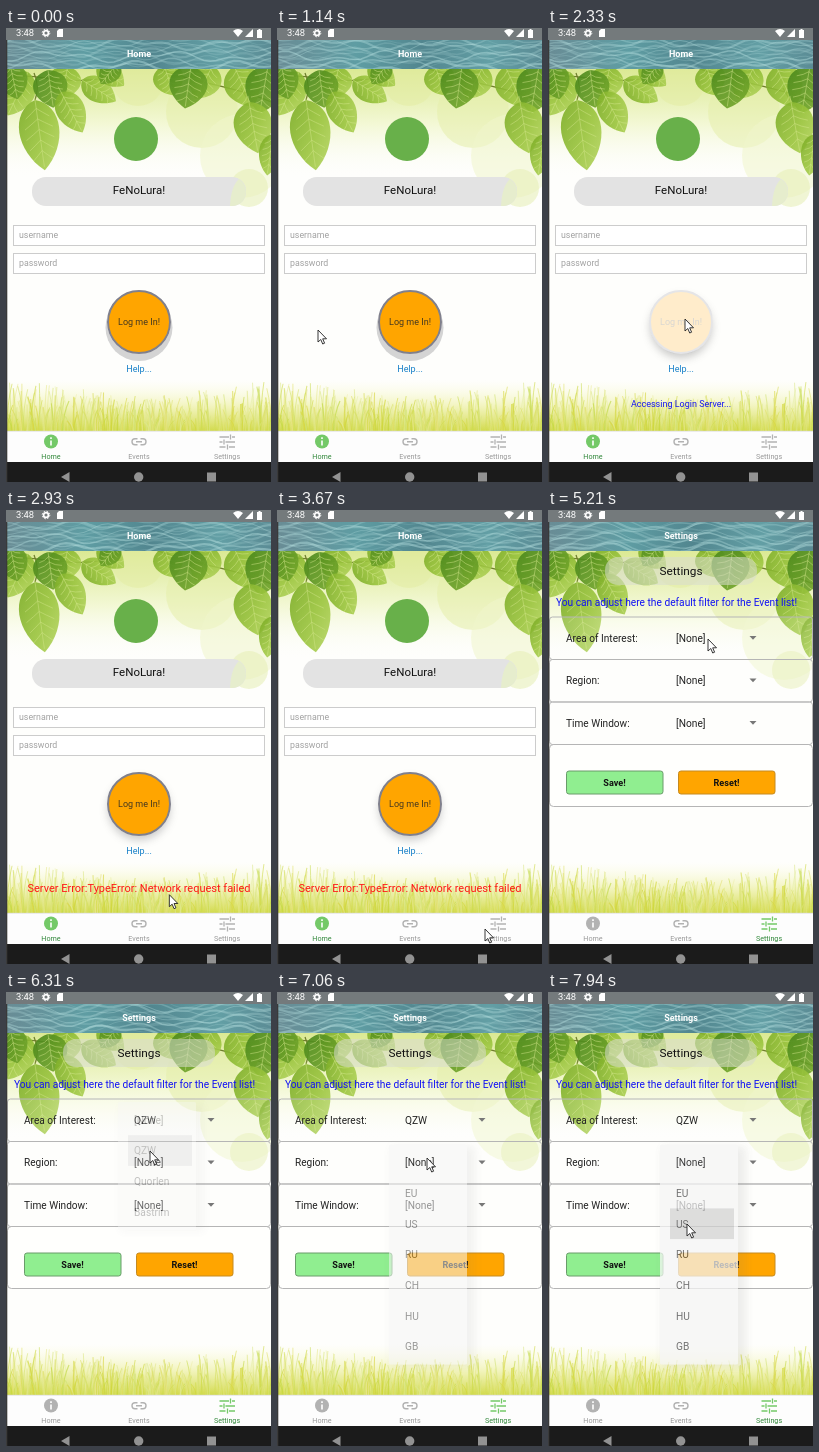
Animation, 265 px wide and 454 px high, one loop 8 s. Source, as an HTML page:

```html
<!DOCTYPE html>
<html lang="en">
<head>
<meta charset="utf-8">
<title>Mobile login and settings</title>
<style>
html, body { margin: 0; width: 100%; height: 100%; overflow: hidden; background: #fff; }
svg { display: block; width: 100%; height: 100%; font-family: Roboto, Arial, sans-serif; }
.mid { text-anchor: middle; }
.bold { font-weight: 700; }
</style>
</head>
<body>
<svg id="stage" viewBox="0 0 265 454"></svg>
<script>
const LOOP = 8000;
const stage = document.getElementById('stage');

let seed = 11;
const random = () => (seed = (seed * 16807) % 2147483647) / 2147483647;
const range = (n, make) => Array.from({ length: n }, (_, i) => make(i)).join('');
const clamp = v => Math.max(0, Math.min(1, v));

// Text is placed by its vertical centre.
const text = (x, y, size, fill, str, cls = '', extra = '') =>
  `<text x="${x}" y="${y + size * .36}" font-size="${size}" fill="${fill}" class="${cls}" ${extra}>${str}</text>`;
const rect = (x, y, w, h, fill, extra = '') =>
  `<rect x="${x}" y="${y}" width="${w}" height="${h}" fill="${fill}" ${extra}/>`;
const circle = (x, y, r, fill, extra = '') =>
  `<circle cx="${x}" cy="${y}" r="${r}" fill="${fill}" ${extra}/>`;
const line = (d, color, width = 1, extra = '') =>
  `<path d="${d}" fill="none" stroke="${color}" stroke-width="${width}" ${extra}/>`;

function leaf([x, y, turn, len, half, tone]) {
  const side = s => `${s * half * 1.3} ${len * .12} ${s * half * 1.25} ${len * .68}`;
  const veins = range(5, i => {
    const v = len * (.12 + i * .15), w = half * (.72 - Math.abs(i - 1.5) * .1);
    return `M${-w} ${v + len * .13}Q${-w * .4} ${v + 4} 0 ${v}Q${w * .4} ${v + 4} ${w} ${v + len * .13}`;
  });
  return `<g transform="translate(${x} ${y}) rotate(${turn})">
    <path d="M0 0C${side(1)} 0 ${len}C${-half * 1.25} ${len * .68} ${-half * 1.3} ${len * .12} 0 0" fill="url(#leaf${tone})" fill-opacity=".9"/>
    ${line(`M0 -6V${len * .95}${veins}`, '#d3e68a', .6, 'opacity=".75"')}</g>`;
}

function grass() {
  return range(330, () => {
    const x = random() * 269 - 2, edge = Math.abs(x - 140) / 140;
    const h = 10 + random() * (24 + 20 * edge), lean = (random() - .5) * 13;
    const hue = 58 + random() * 12, light = 52 + random() * 25;
    return line(`M${x} 404Q${x + lean * .1} ${404 - h * .6} ${x + lean} ${404 - h}`,
      `hsl(${hue} 66% ${light}%)`, .5 + random() * .8, 'opacity=".65"');
  });
}

// x, y, rotation, length, half width, tone
const leaves = [
  [22, 44, 25, 48, 17, 0], [4, 36, -12, 36, 15, 1], [62, 38, 12, 34, 17, 0],
  [42, 42, -8, 38, 18, 1], [29, 72, -8, 71, 21, 0], [55, 64, -28, 46, 15, 0],
  [76, 52, -58, 40, 13, 0], [92, 36, -50, 34, 12, 0], [112, 34, 38, 28, 11, 1],
  [158, 37, -18, 32, 16, 0], [207, 37, 28, 38, 17, 0], [185, 38, 8, 43, 20, 1],
  [228, 38, -25, 45, 19, 0], [262, 38, 10, 48, 20, 1], [243, 74, -10, 52, 20, 0],
  [267, 106, 8, 42, 12, 0]
];

const scenery = `<g clip-path="url(#page)">
  ${rect(0, 41, 265, 362, '#fefefc')}
  ${rect(0, 41, 265, 110, 'url(#glow)')}
  <g fill-opacity=".55">${circle(196, 84, 36, '#e6efab')}${circle(236, 128, 42, '#f0f6cd')}
  ${circle(132, 52, 26, '#e3eda4')}${circle(243, 160, 19, '#e5efb5')}</g>
  ${line('M0 50C28 42 68 62 112 46M150 40C190 56 230 58 265 74M28 45Q34 58 29 72M235 60L243 74', '#6f7f2c', 1.3)}
  ${leaves.map(leaf).join('')}
  ${rect(0, 352, 265, 51, 'url(#meadow)')}${grass()}</g>`;

const field = (y, label) =>
  rect(7.5, y + .5, 251, 20, '#fff', 'stroke="#ccc"') + text(13, y + 10, 8.8, '#a2a2a2', label);

const login = `<g id="login">
  ${circle(130, 111, 22, '#68b04a')}
  ${rect(26, 149, 214, 29, '#e3e3e3', 'rx="14"')}
  <path d="M240 164a14 14 0 0 1-14 14h-2Q225 158 233 151Q240 156 240 164" fill="#e6edcd"/>
  ${text(133, 162, 11.5, '#111', 'FeNoLura!', 'mid')}
  ${field(197, 'username')}${field(225, 'password')}
  ${circle(133, 299.5, 33.5, '#d4d4d4', 'id="hardShadow"')}
  ${circle(133, 299, 31, '#777', 'id="softShadow" opacity=".38" filter="url(#blur)"')}
  ${circle(133, 294, 32, '#fff')}
  <g id="button">${circle(133, 294, 31, '#ffa500', 'stroke="#80808c" stroke-width="2"')}
  ${text(133, 294, 9, '#443820', 'Log me In!', 'mid')}</g>
  ${text(133, 341, 9, '#1880c8', 'Help...', 'mid')}
  ${text(133, 376, 9, '#1616f0', 'Accessing Login Server...', 'mid', 'id="accessing"')}
  ${text(133, 378, 11, '#ff1818', 'Server Error:TypeError: Network request failed', 'mid', 'id="error"')}
</g>`;

const row = (y, label, id) => `
  ${rect(1.5, y - 21, 263, 42.5, '#fff', 'rx="3" fill-opacity=".12" stroke="#b5b5b5"')}
  ${text(18, y, 10.1, '#222', label)}${text(128, y, 10.2, '#222', '[None]', '', `id="${id}"`)}
  <path d="M201.5 ${y - 2}h7l-3.5 3.7z" fill="#777"/>`;
const formButton = (x, fill, border, label) =>
  rect(x + .5, 261, 96.5, 23, fill, `rx="2.5" stroke="${border}"`) +
  text(x + 48.5, 272.5, 9.1, '#111', label, 'mid bold');

// A dropdown list whose first entry lies over its row's value.
function popup(id, y, items, picked) {
  const step = 30.7, top = y - 18, h = items.length * step + 5;
  return `<g id="${id}">
    ${rect(114, top + 2, 84, h, '#777', 'opacity=".16" filter="url(#blur)"')}
    ${rect(112, top, 78, h, '#f5f5f5', 'rx="1.5"')}
    ${rect(122, y + picked * step - 15.5, 64, step, '#d2d2d2', `id="${id}Pick"`)}
    ${items.map((s, i) => text(128, y + i * step, 10.2, '#444', s)).join('')}</g>`;
}

const settings = `<g id="settings">
  ${rect(57, 47, 152, 28, '#d9ddd0', 'rx="13" opacity=".55"')}
  ${text(133, 60.5, 11.8, '#111', 'Settings', 'mid')}
  ${text(8, 92.5, 10.2, '#1212f4', 'You can adjust here the default filter for the Event list!')}
  ${row(128, 'Area of Interest:', 'area')}${row(170.5, 'Region:', 'region')}${row(213, 'Time Window:', 'window')}
  ${rect(1.5, 234.5, 263, 62, '#fff', 'rx="4" fill-opacity=".3" stroke="#b5b5b5"')}
  ${formButton(18, '#90ee90', '#6a9c6a', 'Save!')}${formButton(130, '#ffa500', '#c58a20', 'Reset!')}
  ${popup('areaList', 128, ['[None]', 'QZW', 'Quorlen', 'Bastrim'], 1)}
  ${popup('regionList', 170.5, ['[None]', 'EU', 'US', 'RU', 'CH', 'HU', 'GB'], 2)}
</g>`;

const tab = (id, x, label, icon) => `<g id="${id}">${icon}
  ${text(x, 428.5, 7.2, 'currentColor', label, 'mid')}</g>`;
const chrome = `
  <g clip-path="url(#header)">${rect(0, 12, 265, 29, 'url(#sea)')}
    <g id="water" fill="none" stroke="#b4dede" filter="url(#soften)">${range(13, i =>
      `<path stroke-width="${.8 + i % 3 * .7}" opacity="${.18 + i % 4 * .09}"/>`)}</g></g>
  ${text(133, 26, 9, '#fff', 'Home', 'mid bold', 'id="heading"')}
  ${rect(0, 0, 265, 12, '#747a7c')}
  ${text(10, 5, 9.4, '#fff', '3:48')}
  ${circle(40, 5, 2.4, 'none', 'stroke="#fff" stroke-width="1.7"')}
  ${circle(40, 5, 3.8, 'none', 'stroke="#fff" stroke-width="1" stroke-dasharray="1.5 1.5"')}
  <path d="M51 3l2-2h4v8h-6zM227 3Q232 -1 237 3L232 9zM247 1v8h-8zM251 2h1.5V1h2v1H256v8h-5z" fill="#fff"/>
  ${rect(0, 403, 265, 31, '#fdfdfd')}${line('M0 403.2H265', '#d8d8d8', .7)}
  ${tab('homeTab', 45, 'Home', circle(45, 413.5, 7, 'var(--icon)') +
    line('M45 412.5v5M45 409.2v1.7', '#fff', 1.6))}
  ${tab('eventsTab', 133, 'Events', line('M131.5 410.8H129a3 3 0 0 0 0 6h2.5M134.5 410.8H137a3 3 0 0 1 0 6h-2.5M130 413.8h6', 'var(--icon)', 1.4))}
  ${tab('settingsTab', 221, 'Settings', line('M213.5 409H223M226 409h3M213.5 414h3M219.5 414H229M213.5 419h6M223 419h6M224.5 406.5v5M218 411.5v5M221.5 416.5v5', 'var(--icon)', 1.3))}
  ${rect(0, 434, 265, 20, '#1b1b1b')}
  <path d="M55 449l8.5-5v10z" fill="#929292"/>
  ${circle(132.7, 449, 4.7, '#929292')}${rect(201, 444.5, 9, 9, '#929292')}
  ${rect(0, 12, 1.3, 442, '#3a3a3a')}`;

const stops = list => list.map(([at, color, alpha = 1]) =>
  `<stop offset="${at}" stop-color="${color}" stop-opacity="${alpha}"/>`).join('');
const gradient = (id, dir, list) => `<linearGradient id="${id}" x1="0" y1="0" ${dir}>${stops(list)}</linearGradient>`;
const down = 'x2="0" y2="1"', across = 'x2="1" y2="0"', diagonal = 'x2="1" y2="1"';

stage.innerHTML = `<defs>
  ${gradient('leaf0', diagonal, [[0, '#79aa25'], [.55, '#9ac43d'], [1, '#b9d765']])}
  ${gradient('leaf1', diagonal, [[0, '#46851a'], [1, '#79aa2c']])}
  ${gradient('glow', down, [[0, '#dbe993'], [.5, '#f3f8d5'], [1, '#fefefc', 0]])}
  ${gradient('meadow', down, [[0, '#fbfbe0', 0], [.5, '#f0f2b2', .8], [1, '#d2da4c']])}
  ${gradient('sea', across, [[0, '#698c95'], [.3, '#5f9da3'], [.55, '#52868f'], [.8, '#639fa5'], [1, '#5b8c95']])}
  <clipPath id="page">${rect(0, 41, 265, 362, '#000')}</clipPath>
  <clipPath id="header">${rect(0, 12, 265, 29, '#000')}</clipPath>
  <filter id="blur" x="-30%" y="-30%" width="160%" height="160%"><feGaussianBlur stdDeviation="4"/></filter>
  <filter id="soften"><feGaussianBlur stdDeviation=".6"/></filter>
</defs>${scenery}${login}${settings}${chrome}
<path id="cursor" d="M0 0V12L2.8 9.5 4.7 14 6.6 13.2 4.7 8.8H8.5Z" fill="#fff" stroke="#222" stroke-width=".9"/>`;

const parts = Object.fromEntries([...stage.querySelectorAll('[id]')].map(el => [el.id, el]));
const show = (id, on) => { parts[id].style.display = on ? '' : 'none'; };
const fade = (id, alpha) => { show(id, alpha > 0); parts[id].style.opacity = alpha; };
const pulse = (t, from, rise, to, fall) => clamp((t - from) / rise) * (1 - clamp((t - to) / fall));

// time, x, y
const cursorPath = [
  [500, 4, 395], [1080, 41, 302], [1200, 41, 302], [1680, 137, 291], [2520, 137, 291],
  [2720, 152, 376], [3450, 208, 419], [4250, 208, 419], [5080, 160, 129], [5480, 160, 129],
  [5980, 144, 159], [6480, 144, 159], [6820, 150, 166], [7080, 150, 166], [7600, 139, 232], [8000, 139, 232]
];

function moveCursor(t) {
  show('cursor', t >= cursorPath[0][0]);
  const next = cursorPath.findIndex(key => key[0] > t);
  if (next < 1) return;
  const [t0, x0, y0] = cursorPath[next - 1], [t1, x1, y1] = cursorPath[next];
  const u = (t - t0) / (t1 - t0), k = u * u * (3 - 2 * u);
  parts.cursor.setAttribute('transform', `translate(${x0 + (x1 - x0) * k} ${y0 + (y1 - y0) * k})`);
}

function moveWater(t) {
  const a = t / LOOP * Math.PI * 2;
  [...parts.water.children].forEach((path, i) => {
    const points = range(46, n => {
      const x = n * 6;
      const y = 11 + i * 2.5 + 3.5 * Math.sin(x * .055 + i * 2.1 + a * (2 + i % 3))
        + 2.5 * Math.sin(x * .13 - i * 1.7 - a * (3 + i % 2));
      return `${n ? 'L' : 'M'}${x} ${y.toFixed(1)}`;
    });
    path.setAttribute('d', points);
  });
}

function styleTab(id, active) {
  parts[id].style.color = active ? '#31883a' : '#999';
  parts[id].style.setProperty('--icon', active ? '#74c968' : '#b2b2b2');
}

function draw(t) {
  const onSettings = t >= 4100, pressed = pulse(t, 1750, 120, 2480, 120);
  show('login', !onSettings);
  show('settings', onSettings);
  parts.heading.textContent = onSettings ? 'Settings' : 'Home';
  styleTab('homeTab', !onSettings);
  styleTab('eventsTab', false);
  styleTab('settingsTab', onSettings);

  parts.button.style.opacity = 1 - .8 * pressed;
  parts.button.firstChild.style.strokeOpacity = 1;
  show('hardShadow', t < 1750);
  show('softShadow', t >= 1750);
  show('accessing', t >= 1830 && t < 2500);
  show('error', t >= 2500);

  parts.area.textContent = t < 6230 ? '[None]' : 'QZW';
  fade('areaList', pulse(t, 5420, 150, 6230, 120));
  show('areaListPick', t >= 6090);
  fade('regionList', pulse(t, 6980, 150, 7900, 160));
  show('regionListPick', t >= 7680);

  moveWater(t);
  moveCursor(t);
}

const start = performance.now();
function tick() {
  draw((performance.now() - start) % LOOP);
  requestAnimationFrame(tick);
}
tick();
</script>
</body>
</html>
```
